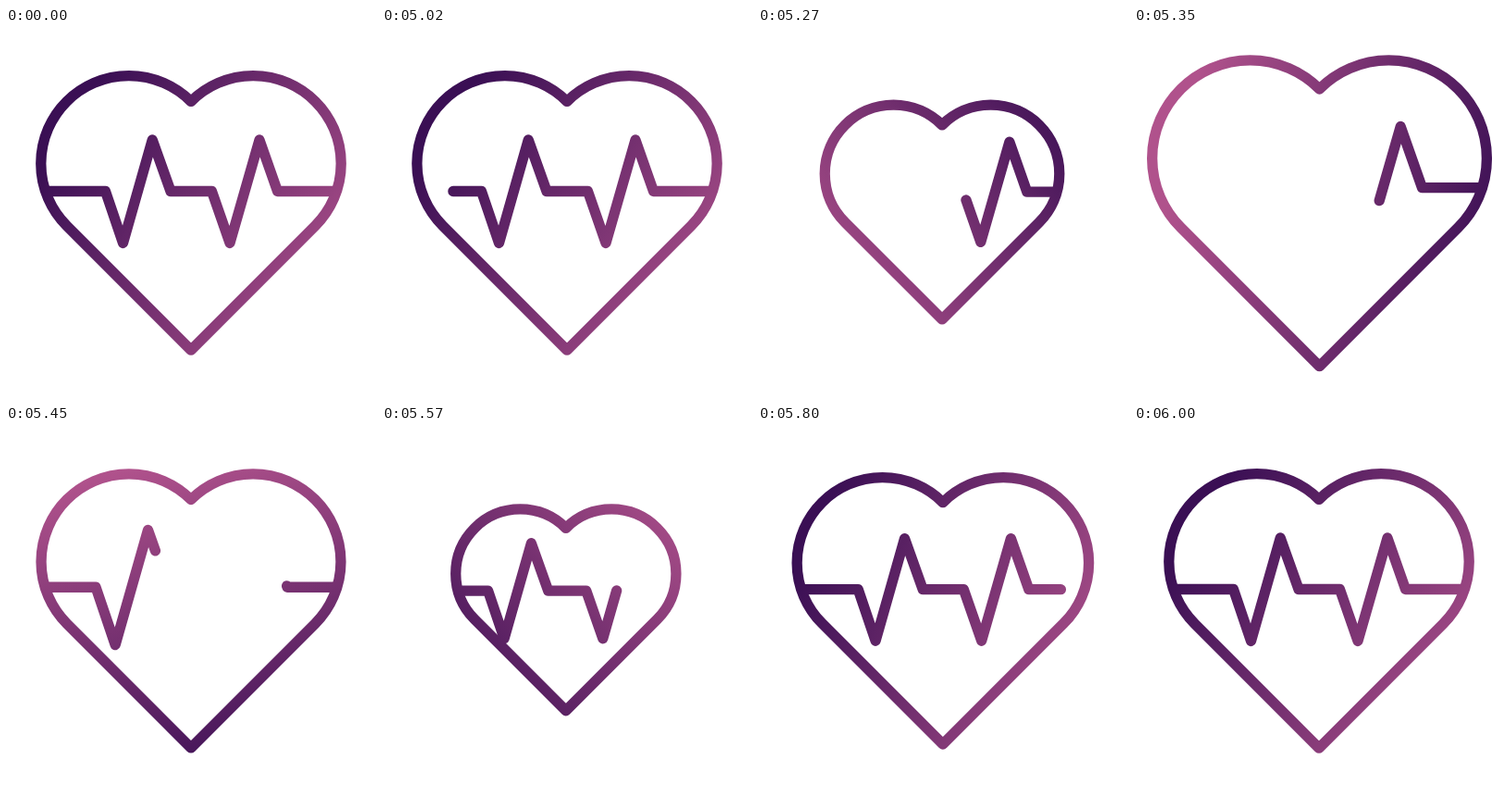
Recreate the animation shown at these times as an HTML page with a canvas. Size 400 by 400 pixels, loop 6020 ms.

```html
<!DOCTYPE html>
<html lang="en">
<head>
<meta charset="utf-8">
<title>Heartbeat</title>
<style>
html, body { margin: 0; height: 100%; overflow: hidden; background: #fff; }
canvas { display: block; }
</style>
</head>
<body>
<canvas width="400" height="400"></canvas>
<script>
const ctx = document.querySelector('canvas').getContext('2d');
const LOOP = 6020, START = 5020, STEP = 25, STEPS = 40;

const PULSE = [[45, 176.5], [107.5, 176.5], [126.5, 232.5], [158.2, 121], [178, 176.5],
  [222.5, 176.5], [242, 232.5], [274, 121], [293.5, 176.5], [356, 176.5]];
// time, heart scale, pulse scale
const BEATS = [[0.02, 1, 1], [0.233, 0.705, 0.92], [0.375, 1.142, 1.21], [0.56, 0.705, 0.915], [1, 1, 1]];

const clamp = x => Math.min(1, Math.max(0, x));
const smooth = x => x * x * (3 - 2 * x);
const quadInOut = x => x < 0.5 ? 2 * x * x : 1 - 2 * (1 - x) ** 2;
const cubicOut = x => 1 - (1 - x) ** 3;

function scalesAt(p) {
  const last = BEATS.length - 1;
  let i = 1;
  while (i < last && p > BEATS[i][0]) i++;
  const a = BEATS[i - 1], b = BEATS[i];
  const u = clamp((p - a[0]) / (b[0] - a[0]));
  const e = i === last ? cubicOut(u) : quadInOut(u);
  return [1, 2].map(j => a[j] + (b[j] - a[j]) * e);
}

// A square standing on its corner with a half circle on each upper side.
function heartPath(scale) {
  const cx = 195.5 + 4.5 * scale, cy = 196 + 17.8 * scale;
  const d = 67.2 * scale, r = d * Math.SQRT2, q = Math.PI / 4;
  const path = new Path2D();
  path.moveTo(cx, cy + 2 * d);
  path.arc(cx - d, cy - d, r, 3 * q, 7 * q);
  path.arc(cx + d, cy - d, r, 5 * q, 9 * q);
  path.closePath();
  return path;
}

function gradientAt(p) {
  const turn = smooth(1 - (1 - p) ** 1.45);
  const angle = (33 + 360 * turn) * Math.PI / 180;
  const x = 180 * Math.cos(angle), y = 180 * Math.sin(angle);
  const g = ctx.createLinearGradient(215 - x, 210 - y, 215 + x, 210 + y);
  g.addColorStop(0, '#3a0f54');
  g.addColorStop(1, '#b0528c');
  return g;
}

// Strokes the part of the pulse between two fractions of its length.
function strokePulse(scale, from, to) {
  if (to <= from) return;
  const pts = PULSE.map(([x, y]) => [200 + (x - 200) * scale, 196.5 + (y - 196.5) * scale]);
  const lengths = pts.slice(1).map(([x, y], i) => Math.hypot(x - pts[i][0], y - pts[i][1]));
  const total = lengths.reduce((a, b) => a + b);
  ctx.beginPath();
  pts.forEach(([x, y], i) => i ? ctx.lineTo(x, y) : ctx.moveTo(x, y));
  ctx.setLineDash([(to - from) * total, 2 * total]);
  ctx.lineDashOffset = -from * total;
  ctx.stroke();
  ctx.setLineDash([]);
}

function draw(t) {
  const p = t < START ? 0 : Math.min(1, (Math.floor((t - START) / STEP) + 1) / STEPS);
  const [heartScale, pulseScale] = scalesAt(p);
  const heart = heartPath(heartScale);

  ctx.fillStyle = '#fff';
  ctx.fillRect(0, 0, 400, 400);
  ctx.strokeStyle = gradientAt(p);
  ctx.lineWidth = 11.3;
  ctx.lineCap = ctx.lineJoin = 'round';

  ctx.save();
  ctx.clip(heart);
  strokePulse(pulseScale, 2 * p, 1);
  if (p > 0.35) {
    const left = (1 - p) / 0.65;
    strokePulse(pulseScale, 0, 1 - 0.6 * left ** 4 - 0.4 * left ** 2);
  }
  ctx.restore();
  ctx.stroke(heart);
}

const begin = performance.now();
function tick() {
  draw((performance.now() - begin) % LOOP);
  requestAnimationFrame(tick);
}
tick();
</script>
</body>
</html>
```
